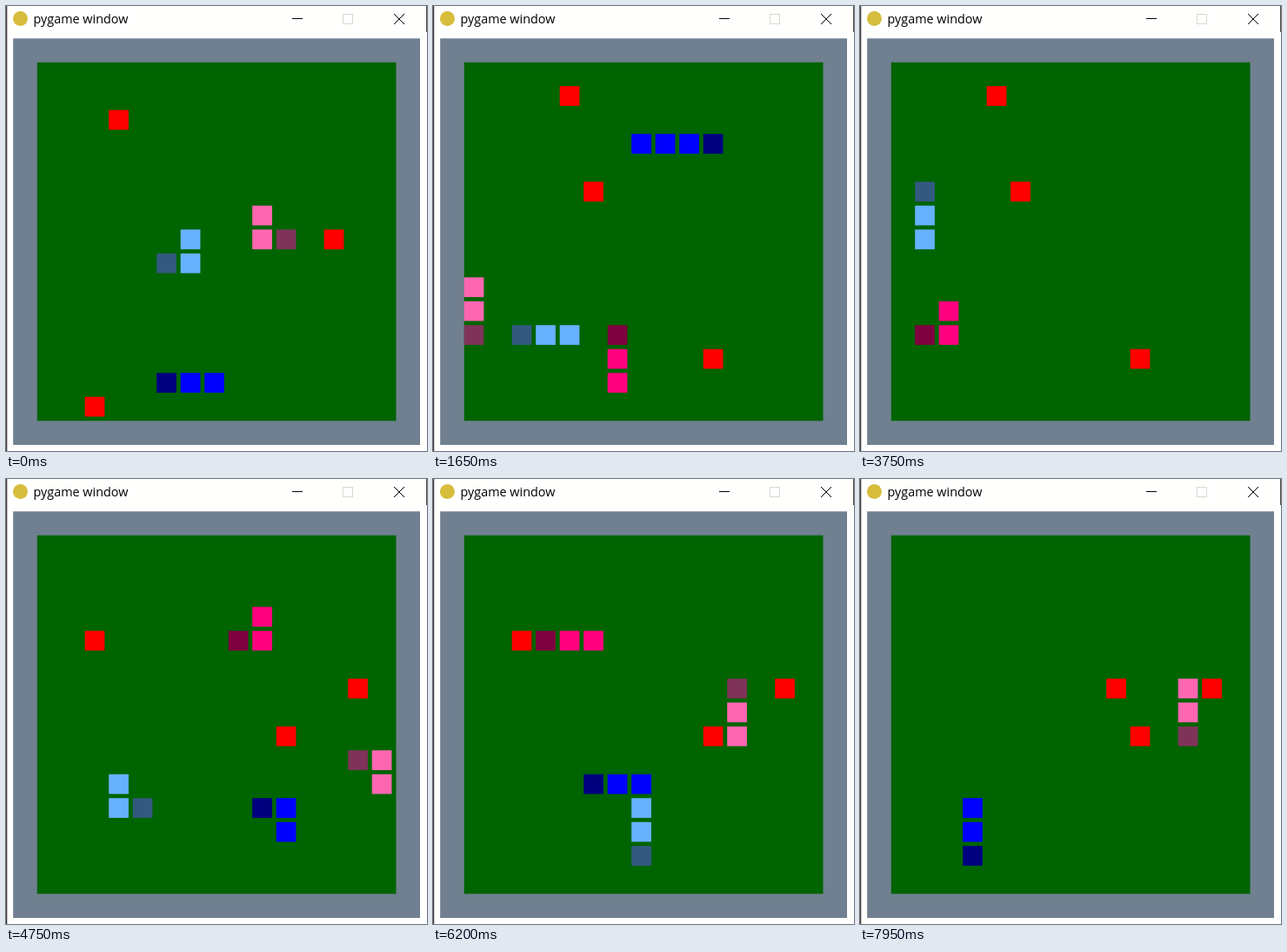
An HTML page with a canvas that plays this animation: 484 by 512 pixels, repeating every 8000 ms.

```html
<!DOCTYPE html>
<html>
<head>
<meta charset="utf-8">
<style>
html, body { margin: 0; width: 484px; height: 512px; overflow: hidden; background: #fff; }
canvas { display: block; }
</style>
</head>
<body>
<canvas id="stage" width="484" height="512"></canvas>
<script>
const ctx = document.getElementById('stage').getContext('2d');
const LOOP = 8000, CELL = 27.5, LEFT = 8.2, TOP = 37.2, SIZE = 22.7;
const DIRS = { L: [-1, 0], R: [1, 0], U: [0, -1], D: [0, 1] };

// [body, head]
const SKY = ['#66b2ff', '#33597f'];
const PINK = ['#ff66b2', '#7f3359'];
const BLUE = ['#0000ff', '#00007f'];
const ROSE = ['#ff007f', '#7f003f'];

// A snake starts at its tail; two steps lay out the body, each further step is one move.
// It dies when its path runs out.
function snake(colors, x, y, path, growAt = Infinity) {
  const cells = [[x, y]];
  for (const c of path) {
    x += DIRS[c][0];
    y += DIRS[c][1];
    cells.push([x, y]);
  }
  return { colors, cells, growAt };
}

// food: x, y, first move, move at which it is eaten
const games = [
  {
    ticks: [0, 300, 550, 850, 1150],
    food: [[4, 3], [13, 8], [3, 15]],
    snakes: [
      snake(SKY, 7, 8, 'DLDDDD'),
      snake(PINK, 10, 7, 'DRUUUU'),
      snake(BLUE, 8, 14, 'LLLLLD')
    ]
  },
  {
    ticks: [1350, 1650, 2000, 2350, 2600, 2900, 3200, 3450, 3700, 4000],
    food: [[6, 6], [11, 13], [11, 4, 0, 1], [5, 2, 1]],
    snakes: [
      snake(SKY, 6, 12, 'LLLLUUUUUUU'),
      snake(ROSE, 7, 15, 'UUUULLLLDLL'),
      snake(PINK, 1, 9, 'DDDDDD'),
      snake(BLUE, 8, 4, 'RRRRRRR', 1)
    ]
  },
  {
    ticks: [4250, 4500, 4750, 5050, 5350, 5600, 5850, 6200, 6500, 6900, 7250, 7600, 7850],
    food: [[14, 7], [11, 9], [3, 5, 0, 8], [10, 7, 8]],
    snakes: [
      snake(SKY, 4, 9, 'DDDRRRRDDD'),
      snake(ROSE, 10, 2, 'DDDLLLLLLLLL', 8),
      snake(PINK, 15, 13, 'UUULLLUUUURDDD'),
      snake(BLUE, 11, 15, 'UUULULLLLLLDDD')
    ]
  }
];

function rect(color, x, y, w, h) {
  ctx.fillStyle = color;
  ctx.fillRect(x, y, w, h);
}

function block(color, [x, y]) {
  rect(color, LEFT + x * CELL, TOP + y * CELL, SIZE, SIZE);
}

function drawWindow() {
  rect('#fffffe', 0, 0, 484, 512);
  rect('#40363a', 0, 0, 1.3, 512);
  rect('#4c4a3c', 483, 0, 1, 30);

  ctx.fillStyle = '#d6bd3c';
  ctx.beginPath();
  ctx.arc(16.5, 14.5, 8.5, 0, 7);
  ctx.fill();

  ctx.fillStyle = '#000';
  ctx.font = '14.4px "Open Sans", "Noto Sans", sans-serif';
  ctx.fillText('pygame window', 31.5, 20);

  rect('#000', 329, 14, 12, 1);
  ctx.lineWidth = 1;
  ctx.strokeStyle = '#d8d8d2';
  ctx.strokeRect(387.5, 9.5, 11, 11);
  ctx.strokeStyle = '#000';
  ctx.beginPath();
  ctx.moveTo(446, 9);
  ctx.lineTo(458, 21);
  ctx.moveTo(458, 9);
  ctx.lineTo(446, 21);
  ctx.stroke();

  rect('#708090', 8.2, 37.3, 467.8, 467.7);
  rect('#006400', 35.8, 64.8, 412.7, 412.5);
}

function drawGame(t) {
  const game = games.filter(g => g.ticks[0] <= t).pop();
  const move = game.ticks.filter(k => k <= t).length - 1;

  for (const [x, y, from = 0, to = Infinity] of game.food) {
    if (move >= from && move < to) block('#ff0000', [x, y]);
  }
  for (const { colors, cells, growAt } of game.snakes) {
    const head = move + 2;
    if (head >= cells.length) continue;
    const length = move >= growAt ? 4 : 3;
    for (let i = length - 1; i >= 0; i--) {
      block(colors[i ? 0 : 1], cells[head - i]);
    }
  }
}

function draw() {
  drawWindow();
  drawGame(performance.now() % LOOP);
  requestAnimationFrame(draw);
}
draw();
</script>
</body>
</html>
```
